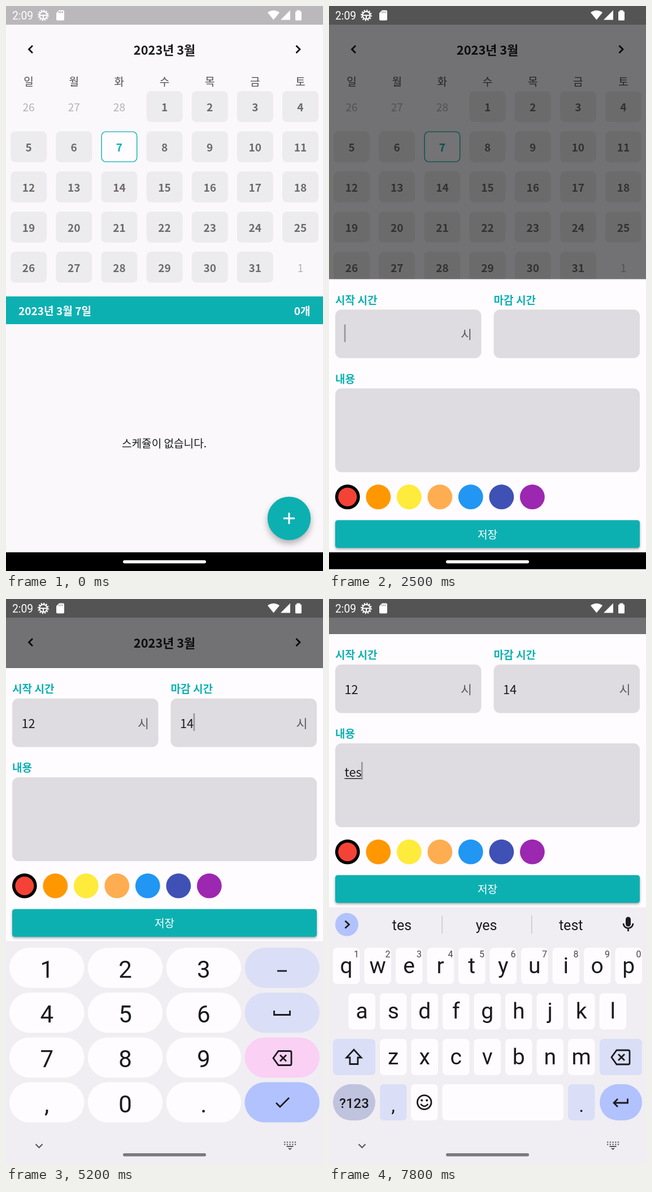
An HTML page with a canvas that plays this animation: 561x998 px, repeating every 8000 ms.

```html
<!DOCTYPE html>
<html lang="ko">
<head>
<meta charset="utf-8">
<style>
  html, body { margin: 0; width: 100%; height: 100%; overflow: hidden; background: #000; }
  canvas { display: block; width: 561px; height: 998px; }
</style>
</head>
<body>
<canvas id="stage" width="561" height="998"></canvas>
<script>
const W = 561, H = 998, LOOP = 8000;
const c = document.getElementById('stage').getContext('2d');
const KR = '"Noto Sans CJK KR", "Noto Sans CJK JP", sans-serif';
const UI = 'Roboto, sans-serif';
const TEAL = '#0db0b1', INK = '#1b1a1d', PAPER = '#fefcff', GREY = '#dedce0';
const BLUE = '#b1c2fe', PALE = '#dadff7', PINK = '#fad0f4', BOARD = '#f0eef2';
const SWATCHES = ['#f44336', '#ff9800', '#ffeb3b', '#ffad50', '#2196f3', '#3f51b5', '#9c27b0'];

// focus = tap time, keys = moment each character arrives
const FIELDS = {
  start: { focus: 2400, blur: 4100, keys: [3200, 3500], text: '12' },
  end: { focus: 4100, blur: 5300, keys: [4500, 4800], text: '14' },
  memo: { focus: 5300, blur: LOOP, keys: [6700, 7200, 7600], text: 'tes' }
};
const SUGGESTIONS = [['t', 'to', 'the'], ['te', 'the', 'tell'], ['tes', 'yes', 'test']];

const slide = (t, start, duration) => {
  const p = Math.min(1, Math.max(0, (t - start) / duration));
  return 1 - (1 - p) ** 3;
};

function rect(x, y, w, h, fill, r = 0) {
  c.beginPath();
  c.roundRect(x, y, w, h, r);
  c.fillStyle = fill;
  c.fill();
}
function disc(x, y, r, fill) {
  c.beginPath();
  c.arc(x, y, r, 0, 7);
  c.fillStyle = fill;
  c.fill();
}
function text(s, x, y, size, color, { weight = 400, align = 'center', font = KR } = {}) {
  c.font = `${weight} ${size}px ${font}`;
  c.textAlign = align;
  c.fillStyle = color;
  c.fillText(s, x, y);
}
function icon(path, x, y, { color = INK, width = 2.8, fill = false, dash = [] } = {}) {
  const shape = new Path2D(path);
  c.save();
  c.translate(x, y);
  c.strokeStyle = c.fillStyle = color;
  c.lineWidth = width;
  c.setLineDash(dash);
  if (fill) c.fill(shape); else c.stroke(shape);
  c.restore();
}
function withShadow(blur, dy, alpha, draw) {
  c.save();
  c.shadowColor = `rgba(0,0,0,${alpha})`;
  c.shadowBlur = blur;
  c.shadowOffsetY = dy;
  draw();
  c.restore();
}
const ring = r => `M${r} 0A${r} ${r} 0 1 1 ${-r} 0A${r} ${r} 0 1 1 ${r} 0`;

function statusBar() {
  const white = { color: '#fff', fill: true };
  text('2:09', 11, 23.5, 19.3, '#fff', { align: 'left', font: UI });
  icon(ring(6.8), 66, 16.5, { color: '#fff', width: 2 });
  icon(ring(8.8), 66, 16.5, { color: '#fff', width: 2.2, dash: [2.3, 2.3] });
  icon('M-6 0H6M0 0V6', 66, 16.5, { color: '#fff', width: 2 });
  icon('M-2-9H5Q7-9 7-7V7Q7 9 5 9H-5Q-7 9-7 7V-4Z', 96, 16.5, white);
  icon('M-2-7V-4M1-7V-4M4-7V-4', 96, 16.5, { color: '#999', width: 1.5 });
  icon('M0 8.5L-10.5-4.5Q0-12 10.5-4.5Z', 473.5, 16, white);
  icon('M8.5-8.5V8.5H-8.5Z', 494.5, 16, white);
  icon('M-3-7V-9H3V-7H4Q5.500-7 5.500-5.500V7.500Q5.500 9 4 9H-4Q-5.500 9-5.500 7.500V-5.500Q-5.500-7-4-7Z', 517.5, 16.500, white);
}

function calendar(t) {
  rect(0, 0, W, H, '#faf8fb');
  rect(0, 0, W, 33, '#bab8bb');
  text('2023년 3월', 280.5, 86, 21.8, INK, { weight: 700 });
  icon('M3.500-6.500L-3 0L3.500 6.500', 43.5, 76.5, { color: '#111' });
  icon('M-3.500-6.500L3 0L-3.500 6.500', 517, 76.5, { color: '#111' });
  const column = i => 40.1 + 80.15 * i;
  [...'일월화수목금토'].forEach((d, i) => text(d, column(i), 141, 19.1, '#4f4d50'));
  for (let i = 0; i < 35; i++) {
    const day = i - 2, x = column(i % 7), y = 150.5 + 70.9 * Math.floor(i / 7);
    const inMonth = day >= 1 && day <= 31, selected = day === 7;
    if (inMonth) rect(x - 32, y, 64, 54.5, selected ? PAPER : '#ecebed', 8);
    if (selected) {
      c.beginPath();
      c.roundRect(x - 31.300, y + .7, 62.600, 53, 7.5);
      c.strokeStyle = TEAL;
      c.lineWidth = 1.4;
      c.stroke();
    }
    const label = day < 1 ? day + 28 : day > 31 ? day - 31 : day;
    text(label, x, y + 35.5, 19.1, selected ? TEAL : inMonth ? '#6c6a6d' : '#b3b1b4',
      { weight: inMonth ? 700 : 400 });
  }
  rect(0, 513, W, 49, TEAL);
  text('2023년 3월 7일', 22, 546, 19.1, '#fff', { weight: 700, align: 'left' });
  text('0개', 538.5, 546, 19.1, '#fff', { weight: 700, align: 'right' });
  text('스케쥴이 없습니다.', 280, 780, 19.1, INK);

  const pressed = t >= 1550;
  withShadow(12, 6, .3, () => disc(501, 905, 38.3, pressed ? '#22b2b4' : TEAL));
  icon('M-10 0H10M0-10V10', 501, 905, { color: '#fff', width: 2.9 });
  if (pressed) disc(489.5, 909.5, 4.7, 'rgba(140,185,192,.7)');
}

function fieldValue(field, t, x, y) {
  if (t < field.focus) return;
  const count = field.keys.filter(k => k <= t).length;
  const value = field.text.slice(0, count);
  text(value, x, y + 25.5, 21.8, INK, { align: 'left' });
  const width = c.measureText(value).width;
  if (field === FIELDS.memo && count) rect(x, y + 28.500, width, 1.4, INK);
  else if (field !== FIELDS.memo) text('시', x + 225.5, y + 25.5, 21.8, '#5b595c', { align: 'right' });
  const since = t - (count ? field.keys[count - 1] : field.focus);
  if (t < field.blur && since % 1000 < 500) rect(x + width - .7, y, 2.7, 31, '#99979a');
}

function sheet(t, y) {
  const label = (s, x, dy) => text(s, x, y + dy, 19.1, TEAL, { weight: 700, align: 'left' });
  rect(0, y, W, H, PAPER);
  label('시작 시간', 11, 44);
  label('마감 시간', 291.5, 44);
  label('내용', 11, 183);
  rect(11, y + 53.7, 258.5, 85.7, GREY, 11);
  rect(291.5, y + 53.7, 258.5, 85.7, GREY, 11);
  rect(11, y + 193, 539, 148, GREY, 11);
  fieldValue(FIELDS.start, t, 27.5, y + 80);
  fieldValue(FIELDS.end, t, 308, y + 80);
  fieldValue(FIELDS.memo, t, 27.5, y + 226);
  SWATCHES.forEach((color, i) => {
    const x = 32.8 + 54.5 * i;
    disc(x, y + 384.7, 21.9, i ? color : '#000');
    if (!i) disc(x, y + 384.7, 16.5, color);
  });
  withShadow(4, 2, .35, () => rect(11, y + 425.7, 539, 49, TEAL, 4.500));
  text('저장', 280.5, y + 458, 19.1, '#fff', { weight: 500 });
}

const BACKSPACE = 'M-7-12.500H13.500Q16-12.500 16-10V10Q16 12.500 13.500 12.500H-7L-16 0ZM-4-5.500L7 5.500M7-5.500L-4 5.500';

function numberPad() {
  ['123', '456', '789', ',0.'].forEach((row, r) => {
    const y = 616 + 79.2 * r;
    for (let i = 0; i < 4; i++) {
      const x = 6 + 138.8 * i;
      rect(x, y, 132.5, 71, i < 3 ? PAPER : [PALE, PALE, PINK, BLUE][r], 35.5);
      if (i < 3) text(row[i], x + 66.2, y + 53, 42, INK, { font: UI });
    }
  });
  icon('M-8.500 0H8.500', 488.5, 657);
  icon('M-14-4V3.500H14V-4', 488.5, 731);
  icon(BACKSPACE, 489, 811);
  icon('M-11 1L-4 8L12-8', 489, 889);
}

function toolbar(t) {
  const typed = FIELDS.memo.keys.filter(k => k <= t).length;
  disc(31.5, 575, 20.5, BLUE);
  if (typed) {
    icon('M-3-6.500L4 0L-3 6.500', 31.5, 575);
    SUGGESTIONS[typed - 1].forEach((word, i) => text(word, 129 + 149.6 * i, 585, 25, INK, { font: UI }));
    rect(199.5, 559, 1.4, 32, '#c6c4c8');
    rect(358, 559, 1.4, 32, '#c6c4c8');
  } else {
    icon('M3-6.500L-4 0L3 6.500', 31.5, 575);
    icon('M-9-11.500H9Q11.500-11.500 11.500-9V4L4 11.500H-9Q-11.500 11.500-11.500 9V-9Q-11.500-11.500-9-11.500ZM11 4H4V11M-6 1Q-2 7 4 2M-6-5H-2M3-5H7', 111.5, 575);
    text('GIF', 191, 582.5, 20.5, INK, { weight: 900, font: UI });
    icon('M-10.500-9.500H10.500V12H-10.500ZM-5-6H5M-6-1H6M-6 3H6M-6 7H2', 271, 575.5, { width: 2.500 });
    disc(271, 565, 3.5, INK);
    icon(ring(7), 350.5, 575, { width: 6 });
    icon(ring(10.8), 350.5, 575, { width: 4, dash: [6, 5.31] });
    rect(399.500, 560, 1.4, 30, '#c6c4c8');
    for (const dx of [-8.5, 0, 8.5]) disc(448.5 + dx, 575, 2.8, INK);
  }
  rect(525, 561.5, 9, 17, INK, 4.5);
  icon('M-8.500-1A8.500 8.500 0 0 0 8.500-1M0 7.500V13', 529.5, 574, { width: 2.7 });
}

function letterBoard(t) {
  const key = (x, y, w, fill = PAPER, r = 7) => rect(x, y, w, 64, fill, r);
  const letters = (row, x0, y) => [...row].forEach((ch, i) => {
    const x = x0 + 55.5 * i;
    key(x, y, 47.5);
    text(ch, x + 23.7, y + 44.7, 39, INK, { font: UI });
  });
  toolbar(t);
  letters('qwertyuiop', 7, 616);
  [...'1234567890'].forEach((n, i) => text(n, 48.5 + 55.5 * i, 633, 16, '#48464a', { font: UI }));
  letters('asdfghjkl', 34.5, 696.5);
  letters('zxcvbnm', 90, 777);
  key(7, 777, 75, PALE);
  icon('M0-13L13 1H7V12.500H-7V1H-13Z', 44, 809);
  key(479, 777, 75, PALE);
  icon(BACKSPACE, 516, 809.5);
  key(7, 857, 75, '#bfc3de', 32);
  text('?123', 44.5, 899, 24, INK, { weight: 500, font: UI });
  key(90, 857, 47.500, PALE);
  text(',', 113.7, 906, 34, INK, { font: UI });
  key(145, 857, 47.5);
  icon(ring(12.3), 168.7, 889);
  icon('M-6.500 3Q0 11 6.500 3', 168.7, 889, { width: 2.5 });
  disc(164.2, 885.5, 2, INK);
  disc(173.2, 885.5, 2, INK);
  key(200.5, 857, 214.5);
  key(423, 857, 47.5, PALE);
  text('.', 446.7, 906, 34, INK, { font: UI });
  key(479, 857, 75, BLUE, 32);
  icon('M12.500-6.500V1H-12M-5-6L-12 1L-5 8', 516, 889);
}

function keyboard(t) {
  const hidden = 394 * (1 - slide(t, 2500, 324));
  const lettersShown = t >= 5400;
  const top = lettersShown ? 544.5 : 604.5;
  c.save();
  c.translate(0, hidden);
  rect(0, top, W, H, BOARD);
  if (lettersShown) letterBoard(t); else numberPad();
  icon('M-6-3L0 3L6-3', 58.5, 966, { color: '#59575b', width: 2.200 });
  icon('M-10.500-4.500H11M-10.500-.5H11', 502.5, 964, { color: '#59575b', width: 2.2, dash: [2.300, 2.400] });
  icon('M-6 4H6M-2.500 7L0 9L2.500 7', 502.500, 963, { color: '#59575b', width: 1.800 });
  c.restore();
}

function draw(t) {
  const shown = slide(t, 1640, 216);
  calendar(t);
  if (shown > 0) {
    rect(0, 0, W, H, `rgba(0,0,0,${.54 * shown})`);
    sheet(t, 965 - 480 * shown - 363 * slide(t, 2500, 437) - 60 * slide(t, 5300, 440));
  }
  statusBar();
  rect(0, 965, W, 33, '#000');
  if (t > 2500) keyboard(t);
  rect(207, 979, 147, 5.5, t < 3000 ? '#fdfbfe' : '#7b797d', 2.75);
}

function tick(now) {
  draw(now % LOOP);
  requestAnimationFrame(tick);
}
requestAnimationFrame(tick);
</script>
</body>
</html>
```
